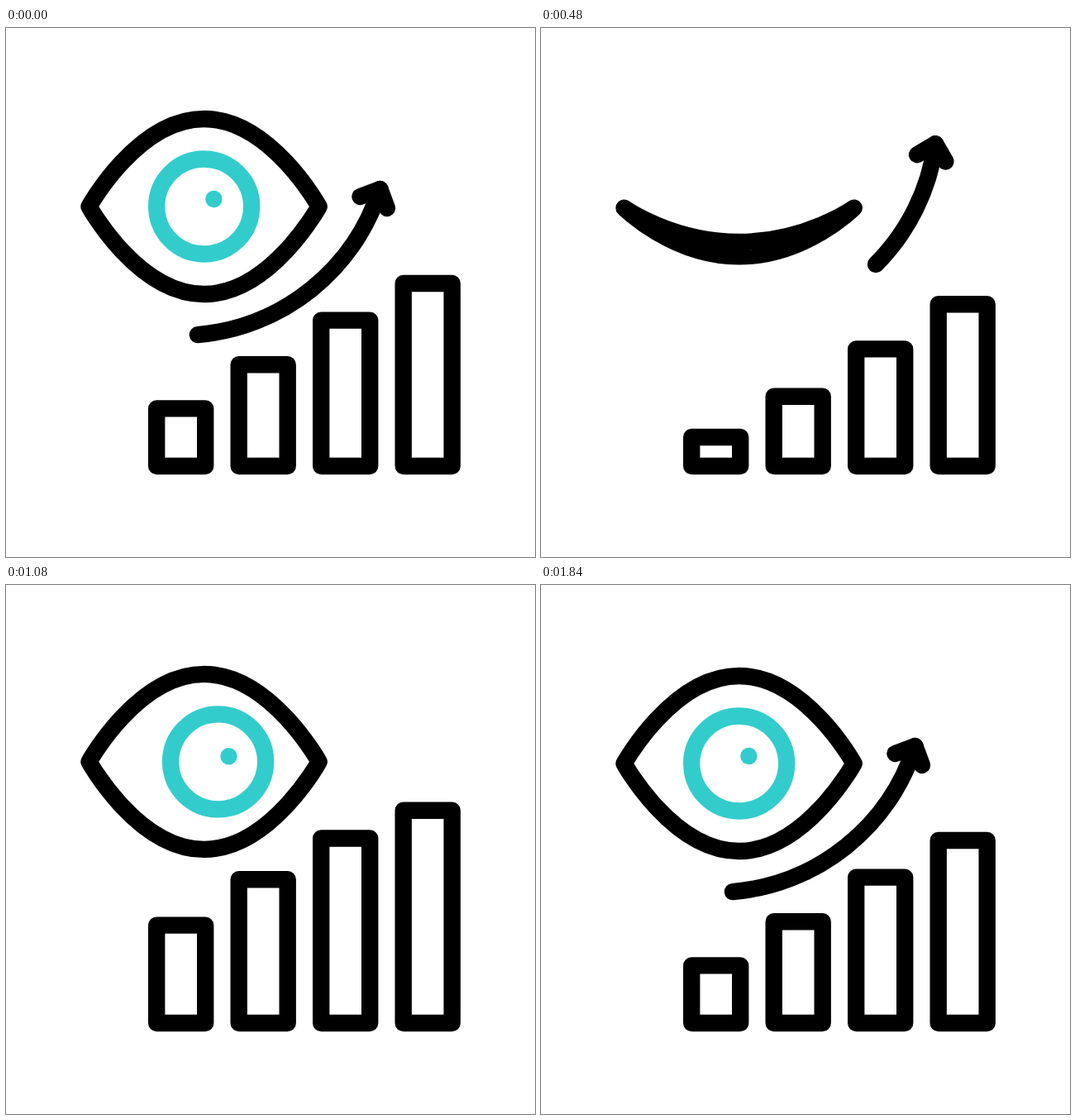
An HTML page that plays this animation: 640 px wide and 640 px high, repeating every 2040 ms.

```html
<!DOCTYPE html>
<html lang="en">
<head>
<meta charset="utf-8">
<title>Vision and growth</title>
<style>
  html, body { margin: 0; width: 100%; height: 100%; overflow: hidden; background: #fff; }
  svg { display: block; width: 100vw; height: 100vh; }
  .ink { stroke: #000; }
  .teal { stroke: #33cccc; }
  .line { fill: none; stroke-width: 20.4; stroke-linecap: round; stroke-linejoin: round; }
</style>
</head>
<body>
<svg viewBox="0 0 640 640">
  <defs><clipPath id="lids"><path id="opening"/></clipPath></defs>
  <g clip-path="url(#lids)">
    <g id="iris">
      <circle class="line teal" r="57.5"/>
      <circle id="pupil" r="10.2" fill="#33cccc"/>
    </g>
  </g>
  <path id="eye" class="line ink"/>
  <g id="arrow">
    <path id="shaft" class="line ink"/>
    <path class="line ink" d="M428.5 204 L452.5 195 L461 218"/>
  </g>
  <g id="bars"></g>
</svg>
<script>
const LOOP = 2040, STEP = 40;
const $ = id => document.getElementById(id);
const set = (el, attrs) => { for (const k in attrs) el.setAttribute(k, attrs[k]); };
const clamp = x => Math.min(1, Math.max(0, x));
const ease = p => (1 - Math.cos(Math.PI * p)) / 2;

// Value at time t from [time, value] keys, eased between neighbours.
function track(keys, t) {
  if (t <= keys[0][0]) return keys[0][1];
  for (let i = 1; i < keys.length; i++) {
    const [t0, a] = keys[i - 1], [t1, b] = keys[i];
    if (t <= t1) return a + (b - a) * ease((t - t0) / (t1 - t0));
  }
  return keys[keys.length - 1][1];
}

const EYE_Y = [[0, 216], [120, 195], [850, 241.3], [910, 241.3], [1225, 192.5], [1460, 216]];
const CLOSED = [[150, 0], [555, 1], [860, 1], [1065, 0]];
const LOOK = [[0, 0], [400, 49], [900, 49], [1200, 0]];
const BAR = [[0, 0], [400, 38.5], [1000, -51], [1600, 0]];

const BAR_TOPS = [460.4, 407.2, 353.6, 309], BASE = 530;
const bars = BAR_TOPS.map((top, i) => {
  const rect = document.createElementNS("http://www.w3.org/2000/svg", "rect");
  set(rect, { class: "line ink", x: 182.2 + i * 99.5, width: 59 });
  $("bars").append(rect);
  return rect;
});

function drawEye(t) {
  const y = track(EYE_Y, t), shut = track(CLOSED, t), dx = track(LOOK, t);
  const top = y - 106 + 160.5 * shut, bottom = y + 106 - 51.5 * shut;
  const d = `M100.5 ${y} C100.5 ${y} 159 ${top} 239.6 ${top} S378.7 ${y} 378.7 ${y}
    C378.7 ${y} 320.2 ${bottom} 239.6 ${bottom} S100.5 ${y} 100.5 ${y}Z`;
  set($("eye"), { d });
  set($("opening"), { d });
  set($("iris"), { transform: `translate(${239.7 + dx} ${y})`, opacity: shut > 0.9 ? 0 : 1 });
  set($("pupil"), { cx: 11.7 + dx * 0.07, cy: -9 + dx * 0.14 });
}

function drawBars(t) {
  bars.forEach((bar, i) => {
    const y = BAR_TOPS[i] + track(BAR, t - i * 80);
    set(bar, { y, height: BASE - y });
  });
}

// The arrow swings away while its tail shortens, then swings back in, fading up.
function drawArrow(t) {
  let trim = 0, transform, opacity;
  if (t < 1200) {
    trim = clamp(t / 600) ** 3.6;
    transform = `rotate(${-22.2 * trim} 150 26)`;
    opacity = trim < 1 ? 1 : 0;
  } else {
    const left = (1 - clamp((t - 1200) / 640)) ** 2.5;
    transform = `rotate(${37.4 * left} 209 102)`;
    opacity = clamp((t - 1200) / 360);
  }
  const r = 254, a = (85.2 - 67.4 * trim) * Math.PI / 180;
  const x = 210.7 + r * Math.cos(a), y = 118 + r * Math.sin(a);
  set($("shaft"), { d: `M${x} ${y} A${r} ${r} 0 0 0 452.5 195` });
  set($("arrow"), { transform, opacity });
}

const start = performance.now();
function frame() {
  const now = Math.max(0, performance.now() - start) % LOOP;
  const t = Math.floor(now / STEP) * STEP;
  drawEye(t);
  drawBars(t);
  drawArrow(t);
  requestAnimationFrame(frame);
}
frame();
</script>
</body>
</html>
```
